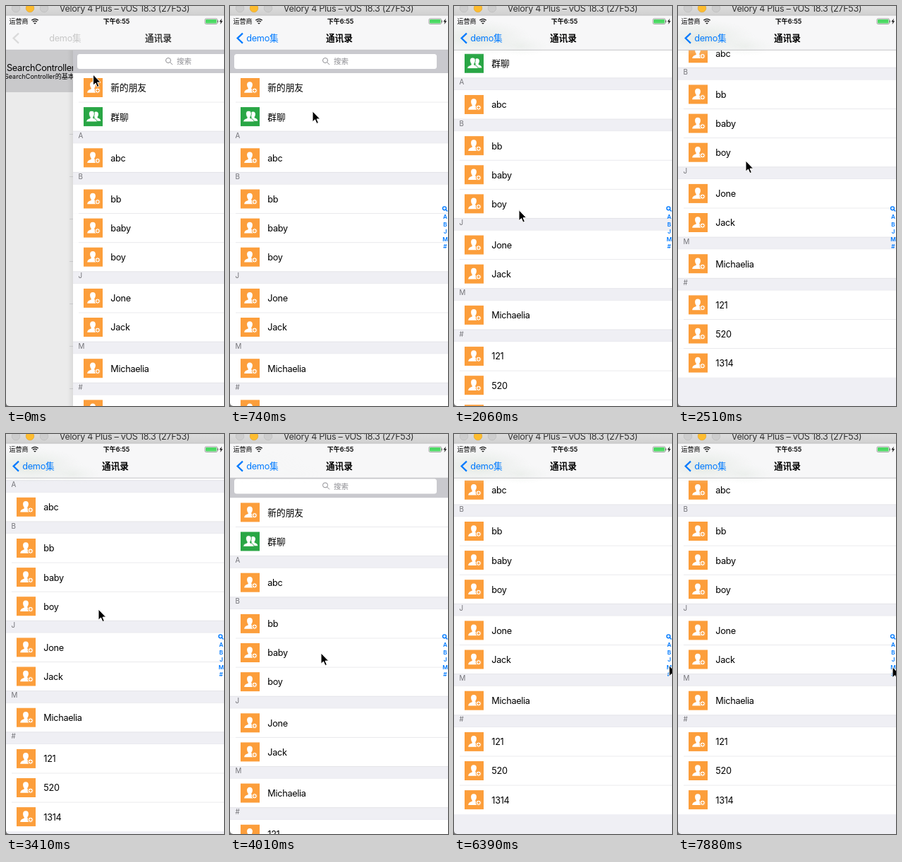
An HTML page for the animation above (8000 ms loop, 309 px wide and 566 px high).

```html
<!DOCTYPE html>
<html lang="zh">
<head>
<meta charset="utf-8">
<title>通讯录</title>
<style>
html, body { margin: 0; width: 100%; height: 100%; overflow: hidden; background: #fff; }
svg { display: block; width: 309px; height: 566px; }
text { font-family: Inter, "Noto Sans CJK SC", "Noto Sans CJK", sans-serif; font-size: 12.7px; }
.latin { letter-spacing: -.3px; }
</style>
</head>
<body>
<svg id="stage" viewBox="0 0 309 566">
  <defs>
    <radialGradient id="tint">
      <stop offset="0" stop-color="#d9e2d9"/>
      <stop offset="1" stop-color="#e6ebe6" stop-opacity="0"/>
    </radialGradient>
    <linearGradient id="chrome" x2="0" y2="1">
      <stop offset="0" stop-color="#dcdcdc"/>
      <stop offset="1" stop-color="#d0d0d0"/>
    </linearGradient>
    <linearGradient id="edge">
      <stop offset="0" stop-color="#000" stop-opacity="0"/>
      <stop offset="1" stop-color="#000" stop-opacity=".07"/>
    </linearGradient>
    <g id="person">
      <path d="M13 5.2c2.8 0 4.1 2 3.9 4.6-.1 1.9-.9 3.2-1.6 4.2v1.6c2.2.8 5.3 1.7 5.6 5.2H5.2c.3-3.5 3.3-4.4 5.5-5.2V14c-.8-1-1.5-2.3-1.6-4.2-.2-2.6 1.1-4.6 3.9-4.6z"/>
    </g>
    <g id="contact">
      <rect width="27" height="27" fill="#fc9e3b"/>
      <use href="#person" fill="#fff"/>
      <circle cx="19.8" cy="17.7" r="3.6" fill="#fff" stroke="#fc9e3b"/>
      <path d="M17.8 17.7h4M19.8 15.7v4" stroke="#fc9e3b" stroke-width="1.2"/>
    </g>
    <g id="group">
      <rect width="27" height="27" fill="#29a645"/>
      <use href="#person" fill="#fff" transform="translate(6.6 2) scale(.85)"/>
      <use href="#person" fill="#fff" stroke="#29a645" stroke-width=".9" transform="translate(-1.6 0)"/>
    </g>
    <g id="lens" fill="none">
      <circle r="3.5"/>
      <path d="M2.5 2.5L6 6"/>
    </g>
  </defs>

  <rect width="309" height="566" fill="#efeff4"/>

  <g id="previous">
    <rect width="309" height="566" fill="#ebebeb"/>
    <rect y="62" width="309" height="60" fill="#c9c9cb"/>
    <text class="latin" x="1" y="91.5">SearchController</text>
    <text x="-2" y="103" style="font-size:9px">SearchController的基本用法</text>
    <path id="ticks" stroke="#d2d2d4"/>
  </g>

  <g id="page">
    <rect x="-8" y="62" width="8" height="504" fill="url(#edge)"/>
    <rect y="62" width="309" height="504" fill="#efeff4"/>
    <g id="list">
      <rect y="62" width="309" height="33" fill="#c9c9ce"/>
      <rect x="6" y="68" width="287" height="21" rx="3.5" fill="#fff"/>
      <use href="#lens" x="135" y="77" stroke="#8e8e93"/>
      <text x="147" y="82.4" fill="#8e8e93" style="font-size:10.5px">搜索</text>
    </g>
    <g id="index" fill="#007aff">
      <use href="#lens" transform="translate(304 286.3) scale(.7)" stroke="#007aff" stroke-width="2"/>
    </g>
  </g>

  <rect y="13" width="309" height="49.5" fill="#f7f7f8"/>
  <g id="haze">
    <ellipse cx="35" cy="45" rx="75" ry="26" fill="url(#tint)"/>
    <ellipse cx="95" cy="57" rx="40" ry="14" fill="url(#tint)" opacity=".5"/>
  </g>
  <path d="M0 62.3h309" stroke="#b9b9bc" stroke-width=".8"/>
  <path id="chevron" d="M18 38.6L10.6 45.6L18 52.6" fill="none" stroke-width="2.2"/>
  <text id="back" class="latin" y="50.1">demo集</text>
  <text id="heading" y="50.2" text-anchor="middle" font-weight="600">通讯录</text>

  <text x="4.5" y="25.2" style="font-size:9px">运营商</text>
  <g fill="none" stroke="#111" stroke-width="1.3">
    <path d="M36.3 20.3q4.7-3.8 9.4 0M38 22.3q3-2.4 6 0"/>
    <path d="M39.7 24.2l1.3 1 1.3-1z" fill="#111" stroke-width=".8"/>
  </g>
  <text x="156.5" y="25.2" text-anchor="middle" font-weight="600" style="font-size:9px">下午6:55</text>
  <rect x="282" y="18" width="17.5" height="7.5" rx="1.6" fill="#fff" stroke="#777" stroke-width=".7"/>
  <rect x="283" y="19" width="15.5" height="5.5" rx=".8" fill="#4cd964"/>
  <path d="M300.4 20.4v2.8" stroke="#777"/>
  <path d="M306 17.8l-3.6 4.5h2.2l-1 3.6 3.6-4.7h-2.2z" fill="#111"/>

  <rect width="309" height="13" fill="url(#chrome)"/>
  <path d="M0 13.2h309" stroke="#b4b4b4" stroke-width=".7"/>
  <g stroke-width=".6">
    <circle cx="14" cy="3" r="5.8" fill="#cdcdcd" stroke="#b9b9b9"/>
    <circle cx="34" cy="3" r="5.8" fill="#fdbc2f" stroke="#e0a228"/>
    <circle cx="54" cy="3" r="5.8" fill="#cdcdcd" stroke="#b9b9b9"/>
  </g>
  <text x="168" y="8" text-anchor="middle" fill="#333" class="latin" style="font-size:12.6px">Velory 4 Plus – vOS 18.3 (27F53)</text>
  <path d="M0 561.5Q.3 565.7 4.5 566H0z" fill="#777"/>

  <path id="cursor" d="M0 0V15.2L3.5 12L5.9 17.6L8.4 16.5L6 11.1H10.7Z" fill="#000" stroke="#fff" stroke-width="1"/>
</svg>
<script>
const LOOP = 8000, STEP = 148.4;
const ROW = 41.1, HEADER = 17.1, LIST_TOP = 95;
const byId = id => document.getElementById(id);

function add(parent, tag, attrs, content = '') {
  const node = document.createElementNS('http://www.w3.org/2000/svg', tag);
  for (const key in attrs) node.setAttribute(key, attrs[key]);
  node.textContent = content;
  parent.append(node);
}

const sections = [
  ['', '新的朋友', '群聊'],
  ['A', 'abc'],
  ['B', 'bb', 'baby', 'boy'],
  ['J', 'Jone', 'Jack'],
  ['M', 'Michaelia'],
  ['#', '121', '520', '1314']
];

function buildList() {
  const list = byId('list');
  let y = LIST_TOP;
  for (const [letter, ...names] of sections) {
    if (letter) {
      add(list, 'rect', { y, width: 309, height: HEADER, fill: '#efeff4' });
      add(list, 'path', { d: `M0 ${y}h309m-309 ${HEADER}h309`, stroke: '#dedee2', 'stroke-width': .7 });
      add(list, 'text', { x: 7.5, y: y + 9.6, fill: '#737378', style: 'font-size:9.8px' }, letter);
      y += HEADER;
    }
    names.forEach((name, i) => {
      const icon = name === '群聊' ? '#group' : '#contact';
      add(list, 'rect', { y, width: 309, height: ROW, fill: '#fff' });
      if (i) add(list, 'path', { d: `M8 ${y}h301`, stroke: '#e2e2e5', 'stroke-width': .7 });
      add(list, 'use', { href: icon, x: 15, y: y + 7 });
      add(list, 'text', { x: 53.3, y: y + 25.4, class: /\w/.test(name) ? 'latin' : '' }, name);
      y += ROW;
    });
  }
}

function buildIndex() {
  [...'ABJM#'].forEach((letter, i) => add(byId('index'), 'text', {
    x: 305, y: 301.2 + i * 10.5, 'text-anchor': 'middle', 'font-weight': 600, style: 'font-size:8.2px'
  }, letter));
}

// Keys are [step, value, ...]; values between keys are interpolated.
const slideKeys = [[0, 95], [1, 36], [2, 10], [3, 0]];
const scrollKeys = [
  [9, 0], [12, 50.5], [15, 125], [17, 148], [20, 135.5], [22, 135.5], [23, 111.5],
  [25, 44], [27, 4.6], [29, 0], [36, 0], [37, 114.7], [38, 135.5]
];
const cursorKeys = [
  [4, 123.5, 97], [9, 91, 356], [12, 91, 306], [17, 96, 219], [22, 131, 224],
  [23, 131, 248], [25, 129, 303], [27, 129, 310], [32, 129, 310], [36, 303, 290],
  [40, 305, 306], [43, 305, 327.5], [45, 305, 327.5], [47, 304, 316],
  [51, 304, 338], [52, 304, 338], [53, 304, 329.5]
];

const mix = (a, b, p) => a + (b - a) * p;

function sample(keys, step) {
  const next = keys.findIndex(key => key[0] > step);
  if (next === 0) return keys[0].slice(1);
  if (next < 0) return keys.at(-1).slice(1);
  const a = keys[next - 1], b = keys[next];
  const p = (step - a[0]) / (b[0] - a[0]);
  return a.slice(1).map((value, i) => mix(value, b[i + 1], p));
}

const blend = (from, to, p) => `rgb(${from.map((c, i) => Math.round(mix(c, to[i], p)))})`;
const move = (id, x, y) => byId(id).setAttribute('transform', `translate(${x} ${y})`);

function render(time) {
  const step = Math.floor((time % LOOP) / STEP + .1);
  const [slide] = sample(slideKeys, step);
  const [scroll] = sample(scrollKeys, step);
  const entering = slide / 95;

  byId('previous').style.display = slide ? '' : 'none';
  move('page', slide, 0);
  move('list', 0, -scroll);
  move('cursor', ...sample(cursorKeys, step));
  byId('haze').setAttribute('opacity', Math.min(1, scroll / 60) * .7);

  byId('heading').setAttribute('x', 155 + 61 * entering);
  byId('heading').setAttribute('fill', blend([0, 0, 0], [60, 60, 60], entering));
  byId('back').setAttribute('x', 23.3 + 38 * entering);
  byId('back').setAttribute('fill', blend([0, 122, 255], [200, 200, 200], entering));
  byId('chevron').setAttribute('stroke', blend([0, 122, 255], [218, 218, 218], entering));
}

buildList();
buildIndex();
byId('ticks').setAttribute('d', Array.from({ length: 7 }, (_, i) => `M90 ${181.5 + i * 60}h5`).join(''));

const start = performance.now();
function tick() {
  render(performance.now() - start);
  requestAnimationFrame(tick);
}
tick();
</script>
</body>
</html>
```
